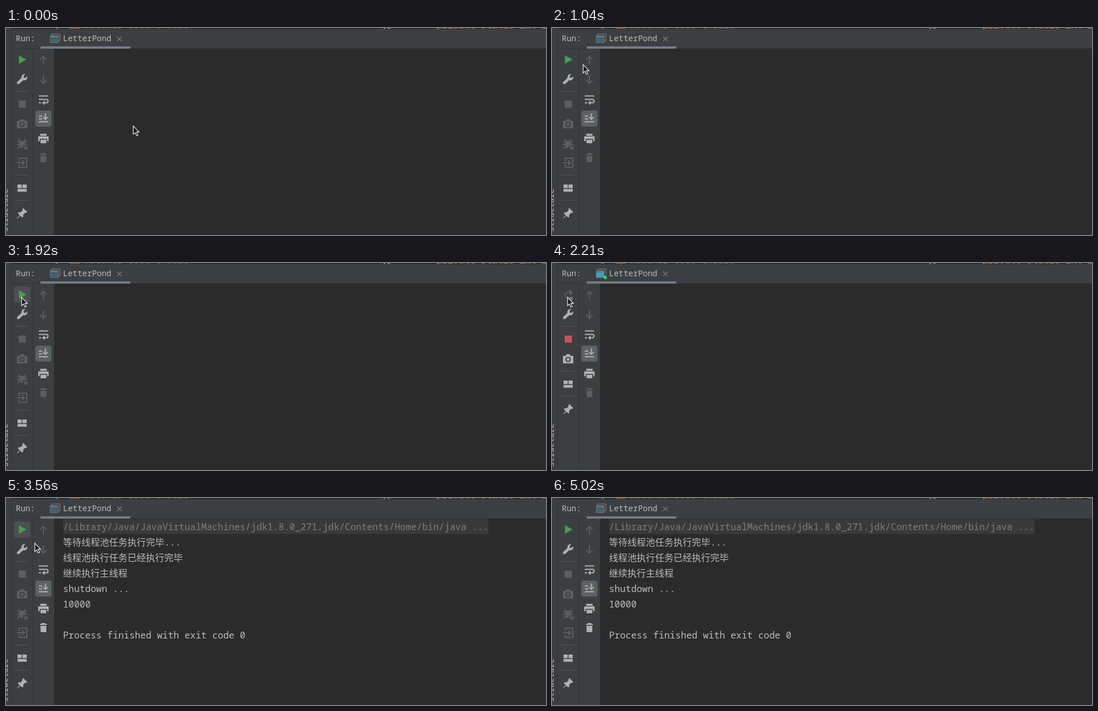
Write an HTML page that moves like this. It is 938 by 361 pixels and loops after 6.7 s.

```html
<!DOCTYPE html>
<html lang="zh-CN">
<head>
<meta charset="utf-8">
<title>Run console</title>
<style>
  html, body { margin: 0; width: 100%; height: 100%; overflow: hidden; background: #2b2b2b; }
  svg { display: block; width: 938px; height: 361px; }
  text { font: 14px 'Noto Sans Mono', 'Noto Sans CJK SC', 'DejaVu Sans', monospace; fill: #bbb; white-space: pre; }
  .code text, .sliver text { font-size: 16px; }
  .code text { fill: #bcbcbc; }
  .line { fill: none; stroke: currentColor; stroke-width: 2; }
  #tip rect { filter: drop-shadow(0 2px 3px rgba(0, 0, 0, .3)); }
</style>
</head>
<body>
<svg viewBox="0 0 938 361">
  <defs>
    <path id="play" d="M-5.5-7.5 7.5 0-5.5 7.5z" fill="currentColor"/>
    <g id="rerun">
      <path class="line" d="M3-5.5A6 6 0 1 0-1 6"/>
      <path d="M2-10 9-4 2 1z" fill="currentColor"/>
      <path d="M2 3h6v6h-6z" fill="#6e7173"/>
    </g>
    <path id="wrench" d="M-8.5 5.2-1.2-2A5.2 5.2 0 0 1 5.6-8.2L2.4-5 3-2.4 5.6-1.8 8.6-4.8A5.2 5.2 0 0 1 2 2L-5.2 8.6Q-7 9.6-8.4 8.4-9.8 6.8-8.5 5.2z" fill="currentColor"/>
    <path id="stop" d="M-6-6.5H6.5V6H-6z" fill="currentColor"/>
    <path id="camera" fill="currentColor" fill-rule="evenodd" d="M-9-5h4.5l2-3h5l2 3H9V8H-9zM0-3.5a4.7 4.7 0 1 0 .01 0zM0-1.5a2.7 2.7 0 1 1-.01 0z"/>
    <g id="bug">
      <ellipse cx="0" cy="1" rx="5" ry="6.5" fill="currentColor"/>
      <path class="line" d="M-3.5-4-5.5-8M3.5-4 5.5-8M-9 1H9M-8 8-4 4M-8-5-4-2M8-5 4-2"/>
      <path d="M1 2.5H10V10H1z" fill="#3c3f41"/>
      <path class="line" d="M2.5 3.5 8 9M8.5 4V9H3.5"/>
    </g>
    <path id="door" class="line" d="M-5-3V-8H8V8H-5V3"/>
    <path id="arrow" class="line" d="M-9 0H3M0-4 4 0 0 4"/>
    <path id="layout" d="M-8-6H-.7V.3H-8zM.7-6H8V.3H.7zM-8 1.7H8V6.5H-8z" fill="currentColor"/>
    <path id="pin" d="M2-9 9-2 7-.5 5.5-1 1.8 2.7 2 6 .2 7.5-3.2 4.2-8.5 9.2-9 8.7-4.2 3.2-7.5 0-6-1.8-2.7-1.6 1-5.4.5-7.5z" fill="currentColor"/>
    <path id="rule" d="M-12 0H11" stroke="currentColor"/>
    <path id="up" class="line" d="M0 7.5V-6M-5.5-.8 0-6.4 5.5-.8"/>
    <path id="down" class="line" d="M0-7.5V6M-5.5.8 0 6.4 5.5.8"/>
    <g id="wrap">
      <path class="line" d="M-8-6H8M-8 0H5a3 3 0 0 1 0 6H1M-8 6H-4"/>
      <path d="M2 2V10L-2.5 6z" fill="currentColor"/>
    </g>
    <path id="end" class="line" d="M-8 6.5H8M-8 1.5H-2M-8-3.5H-2M3.5-8V2M-.5-1.6 3.5 2.3 7.5-1.6"/>
    <path id="print" fill="currentColor" fill-rule="evenodd" d="M-5.5-8H5.5V-4.5H-5.5zM-9-3.5H9V5H6.5V1H-6.5V5H-9zM-5 2.5H5V8.5H-5z"/>
    <path id="trash" fill="currentColor" d="M-6-6.5H-3V-8H3V-6.5H6V-4.5H-6zM-5-3H5V6.5Q5 8 3.5 8H-3.5Q-5 8-5 6.5z"/>
  </defs>

  <rect width="938" height="361" fill="#3c3f41"/>
  <rect x="10" width="928" height="2" fill="#2b2b2b"/>
  <g class="sliver">
    <path d="M110 0h18v1h-18z" fill="#c4622c"/>
    <path d="M86 0h4v1h-4zM656 0h2v2h-2zM662 0h5v1h-5z" fill="#9a9c9e"/>
    <path d="M650 0v2" stroke="#6a4a30"/>
    <text x="135" y="1" style="fill:#69801f">watcher code ensure</text>
    <text x="748" y="1" style="fill:#cc7832;font-weight:bold">private static int</text>
    <path d="M931 0h7v1h-7z" fill="#9876aa"/>
  </g>
  <rect x="10" y="2" width="928" height="34" fill="#3c3f41"/>
  <path d="M9.5 0V361M46.5 36V361" stroke="#323436"/>
  <path d="M10 35.5H938" stroke="#323436"/>
  <rect x="83.5" y="36" width="855" height="325" fill="#2b2b2b"/>
  <rect x="60" y="32" width="156" height="4" fill="#747a87"/>
  <text transform="translate(2.5 355.6) rotate(-90)">Structure</text>

  <text x="17" y="23">Run:</text>
  <path d="M79.5 13V10.5H93.5V22.5H91" fill="none" stroke="#6c7275" stroke-width="1.4"/>
  <rect x="76.5" y="13" width="14.5" height="13" fill="#6c7578"/>
  <rect id="tabFill" x="77.5" y="16" width="12.5" height="9"/>
  <circle id="tabDot" cx="92.5" cy="25.5" r="2.8" fill="#2be82b"/>
  <text class="name" x="99" y="23"></text>
  <path d="M193 15 201 23M201 15 193 23" stroke="#7b7e80" stroke-width="1.2"/>

  <rect id="hover" x="14" y="41" width="28" height="28" rx="4" fill="#4c5052"/>
  <rect x="51" y="144" width="28" height="28" rx="4" fill="#5c6164"/>
  <g id="bars"></g>
  <g id="out" class="code"></g>
  <g id="tip">
    <rect x="42" y="84" width="207" height="29" fill="#4b4d4d"/>
    <text x="52" y="103">Rerun '<tspan class="name"></tspan>'</text>
    <text x="219.5" y="102.5" style="fill:#a0a2a3"><tspan font-size="10">⌘</tspan><tspan x="228">R</tspan></text>
  </g>
  <path id="mouse" d="M.5.5V15L3.8 12 6.3 17.6 8.6 16.6 6.2 11.1H10.6z" fill="#161616" stroke="#fff" stroke-width="1.1"/>
</svg>
<script>
const LOOP = 6700;
const NAME = 'LetterPond';
const LIT = '#afb1b3', DIM = '#5c5f61', RULE = '#555859', GREEN = '#499c54', RED = '#c75450';
const $ = id => document.getElementById(id);
const show = (el, on) => { el.style.display = on ? '' : 'none'; };

document.querySelectorAll('.name').forEach(el => { el.textContent = NAME; });

const icons = (x, list) => list.map(([id, y, color = LIT]) =>
  `<use href="#${id}" x="${x}" y="${y}" color="${color}"/>`).join('');

const tools = [['wrench', 89], ['rule', 110.5, RULE]];
const tail = y => [['rule', y + .5, RULE], ['layout', y + 23], ['rule', y + 44.5, RULE], ['pin', y + 67]];
const exit = (y, door, arrow) => [['door', y, door], ['arrow', y, arrow]];
const live = [...tools, ['stop', 133, RED], ['camera', 167]];
const BARS = {
  idle: [['play', 55, GREEN], ...tools, ['stop', 133, DIM], ['camera', 167, DIM],
         ['bug', 202, DIM], ...exit(235, DIM, DIM), ...tail(256)],
  start: [['rerun', 56, DIM], ...live, ...tail(188)],
  run: [['rerun', 56, GREEN], ...live, ...exit(201, LIT, '#db5860'), ...tail(222)]
};
const SIDE = [['up', 56, DIM], ['down', 90, DIM], ['wrap', 124.5], ['end', 157], ['print', 192.5]];

const LINES = [
  '/Library/Java/JavaVirtualMachines/jdk1.8.0_271.jdk/Contents/Home/bin/java ...',
  '等待线程池任务执行完毕...', '线程池执行任务已经执行完毕', '继续执行主线程',
  'shutdown ...', '10000', '', 'Process finished with exit code 0'
];
$('out').innerHTML = LINES.map((s, i) => '<g>' +
  (i ? '' : '<rect x="99" y="37" width="739" height="26" fill="#393939"/>') +
  `<text x="99" y="${56 + 27 * i}"${i ? '' : ' style="fill:#808080"'}>${s}</text></g>`).join('');

// time, toolbar, lines shown, tab running, button hover, tooltip
const SCENES = [
  [0, 'idle', 0, 0, 0, 0],
  [1190, 'idle', 0, 0, 1, 0],
  [1770, 'idle', 0, 0, 1, 1],
  [1920, 'idle', 0, 0, 1, 0],
  [2210, 'start', 0, 1, 0, 0],
  [2360, 'run', 1, 1, 0, 0],
  [2660, 'run', 6, 1, 0, 0],
  [2810, 'run', 8, 1, 0, 0],
  [2960, 'idle', 8, 0, 0, 0],
  [3110, 'idle', 8, 0, 1, 0],
  [3710, 'idle', 8, 0, 0, 0]
];
// time, pointer x, y
const MOVES = [
  [0, 220, 170], [150, 440, 226], [300, 693, 287], [450, 640, 268], [600, 430, 196],
  [750, 230, 126], [890, 110, 83], [1040, 53, 63], [1190, 33, 60], [1330, 26, 59],
  [3560, 49, 78], [3710, 76, 98], [3850, 108, 122], [4000, 145, 150], [4150, 190, 183],
  [4290, 240, 218], [4440, 293, 250], [4590, 696, 299], [4730, 865, 330],
  [4880, 882, 345], [5020, 960, 380]
];
const pick = (steps, t) => steps.findLast(s => s[0] <= t);

let scene;
function draw(t) {
  const [, x, y] = pick(MOVES, t);
  $('mouse').setAttribute('transform', `translate(${x + .6} ${y + .3})`);
  const next = pick(SCENES, t);
  if (next === scene) return;
  scene = next;
  const [, bar, lines, running, hover, tip] = scene;
  $('bars').innerHTML = icons(28, BARS[bar]) +
    icons(65, [...SIDE, ['trash', 226, lines ? LIT : DIM]]);
  [...$('out').children].forEach((el, i) => show(el, i < lines));
  $('tabFill').setAttribute('fill', running ? '#3d9cc0' : '#3f6272');
  show($('tabDot'), running);
  show($('hover'), hover);
  show($('tip'), tip);
}

const began = performance.now();
function tick() {
  draw((performance.now() - began) % LOOP);
  requestAnimationFrame(tick);
}
tick();
</script>
</body>
</html>
```
